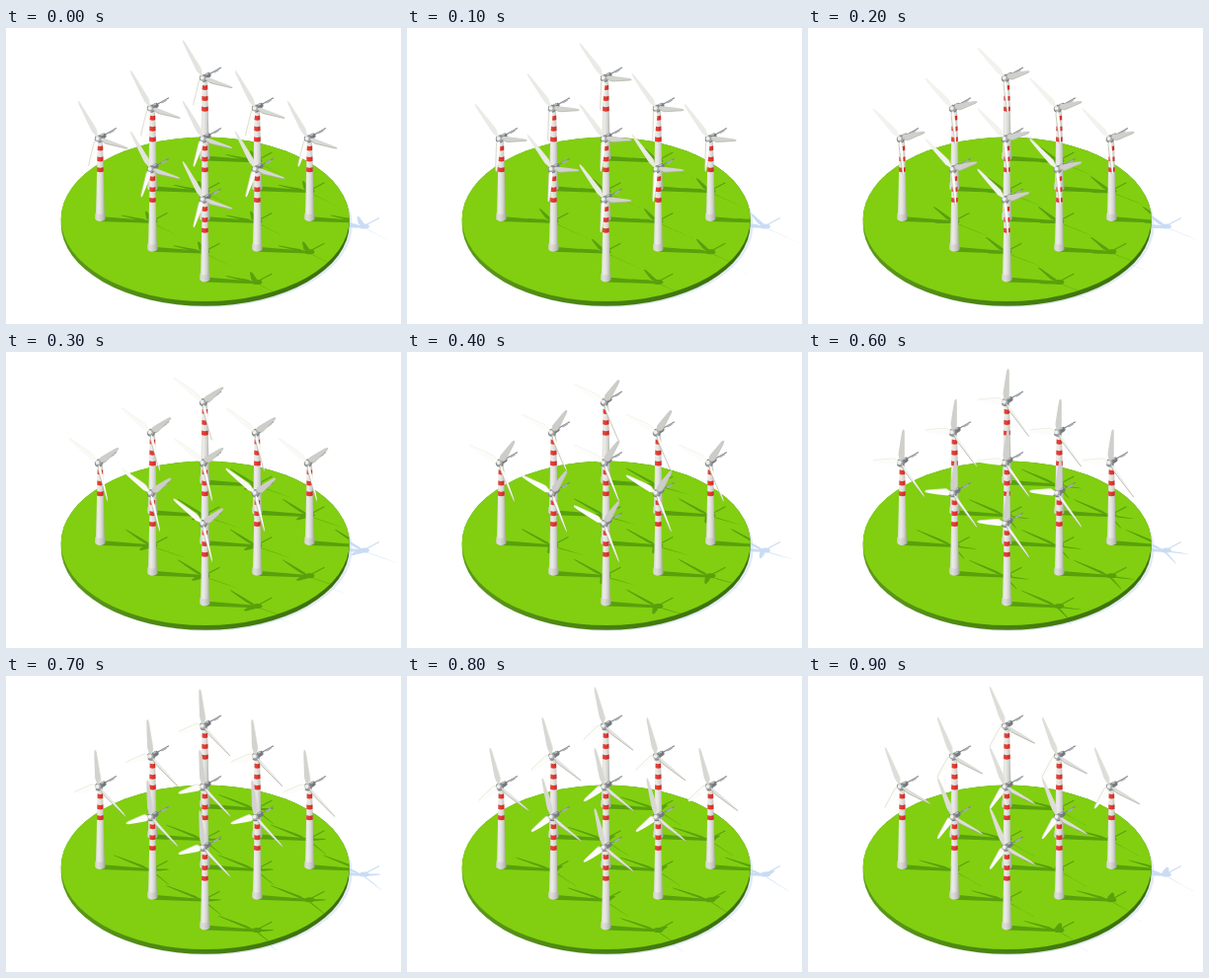
Recreate the animation shown at these times as an HTML page with a canvas. Size 400 px wide and 300 px high, loop 1 s.

```html
<!DOCTYPE html>
<html lang="en">
<head>
<meta charset="utf-8">
<title>Wind farm</title>
<style>
  html, body { margin: 0; width: 100%; height: 100%; overflow: hidden; background: #fff; }
  canvas { display: block; width: 400px; height: 300px; }
</style>
</head>
<body>
<canvas id="stage" width="400" height="300"></canvas>
<script>
const ctx = document.getElementById('stage').getContext('2d');

const LOOP = 1000, STEPS = 10;
const START = 42, SWEEP = 120;      // degrees, counterclockwise from upright
const RADIUS = 43;
const DISC = { x: 201.7, y: 193.8, rx: 146, ry: 83.2, depth: 4.8 };
const BASE = { x: 2, y: 82.5 };     // tower foot, from the hub
const CAST = { x: 51, y: 3 };       // shadow of the hub, from the foot
const PITCH = 12 * Math.PI / 180;

// Blade outline: distance along the blade, half chords on both sides
const OUTLINE = [
  [0.05, 1.4, -1.4], [0.12, 1.9, -2], [0.2, 3, -3.8], [0.28, 3, -3.8],
  [0.6, 2.3, -2.6], [0.92, 1.4, -1.4], [1, 0.6, -0.6]
];

const turbines = [];
for (let sum = 0; sum < 5; sum++)
  for (let i = 0; i < 3; i++) {
    const j = sum - i;
    if (j >= 0 && j < 3) turbines.push({ x: 199.4 + (i - j) * 53, y: 50.5 + sum * 30.75 });
  }

// h: across the rotor, v: up, a: along the axle
const view = (h, v, a) => [0.707 * (h + a), 0.403 * (h - a) - 0.823 * v];
const cast = (h, v, a) => [0.707 * (h + a) + 0.5 * v, 0.403 * (h - a) + 0.03 * v];

// Both long sides of a blade, each from root to tip
function bladeSides(x, y, angle, project) {
  const s = Math.sin(angle), c = Math.cos(angle);
  const point = (r, w) => {
    const t = w * Math.cos(PITCH), a = -w * Math.sin(PITCH);
    const [px, py] = project(-s * r * RADIUS - c * t, c * r * RADIUS - s * t, a);
    return [x + px, y + py];
  };
  return [OUTLINE.map(([r, w]) => point(r, w)), OUTLINE.map(([r, , w]) => point(r, w))];
}

function trace(pts) {
  pts.forEach(([x, y], n) => n ? ctx.lineTo(x, y) : ctx.moveTo(x, y));
}

function fillPath(color, build) {
  ctx.beginPath();
  build();
  ctx.closePath();
  ctx.fillStyle = color;
  ctx.fill();
}

const poly = (color, pts) => fillPath(color, () => trace(pts));

function ellipse(color, x, y, rx, ry) {
  fillPath(color, () => ctx.ellipse(x, y, rx, ry, 0, 0, Math.PI * 2));
}

function line(color, width, ...pts) {
  ctx.beginPath();
  trace(pts);
  ctx.strokeStyle = color;
  ctx.lineWidth = width;
  ctx.stroke();
}

const spokes = turn => [0, 1, 2].map(n => (turn + n * 120) * Math.PI / 180);

function shadow(t, turn, color, dx, dy) {
  const fx = t.x + BASE.x + dx, fy = t.y + BASE.y - 1 + dy;
  const cx = fx + CAST.x, cy = fy + CAST.y;
  poly(color, [[fx, fy - 2.6], [cx, cy - 1.2], [cx, cy + 1.2], [fx, fy + 2.4]]);
  ellipse(color, cx + 2, cy - 0.5, 5, 2.6);
  line(color, 1.2, [cx, cy], [cx + 17, cy - 9]);
  for (const angle of spokes(turn)) {
    const [a, b] = bladeSides(cx, cy, angle, cast);
    poly(color, a.concat(b.reverse()));
  }
}

function sideShade(x, half, stops) {
  const g = ctx.createLinearGradient(x - half, 0, x + half, 0);
  stops.forEach((color, n) => g.addColorStop(n / (stops.length - 1), color));
  return g;
}

function tower(x, top, foot) {
  const half = y => 2.6 + 1.9 * (y - top) / (foot - top);
  const band = (color, y1, y2) => {
    const a = half(y1), b = half(y2);
    fillPath(color, () => {
      ctx.moveTo(x - a, y1);
      ctx.quadraticCurveTo(x, y1 + 1.6, x + a, y1);
      ctx.lineTo(x + b, y2);
      ctx.quadraticCurveTo(x, y2 + 1.6, x - b, y2);
    });
  };
  const white = sideShade(x, 4.5, ['#dcdcd8', '#ecece8', '#d6d6d2', '#a8aaa3']);
  const red = sideShade(x, 3.5, ['#dc4a42', '#e3382f', '#c02a24']);
  band(white, top, foot);
  for (const y of [5.2, 16.2, 27]) band(red, top + y, top + y + 4.5);
  const ring = sideShade(x, 5.3, ['#d4d4cf', '#deded9', '#c8c8c3', '#9fa19a']);
  fillPath(ring, () => {
    ctx.moveTo(x - 5, foot - 7);
    ctx.quadraticCurveTo(x, foot - 4.5, x + 5, foot - 7);
    ctx.lineTo(x + 5.2, foot - 1);
    ctx.quadraticCurveTo(x, foot + 4, x - 5.2, foot - 1);
  });
}

// Light that is strongest on blades pointing towards `peak` degrees
function shade(angle, base, swing, peak, tint) {
  const k = Math.min(252, Math.round(base + swing * Math.cos(angle - peak * Math.PI / 180)));
  return `rgb(${k},${k},${k - tint})`;
}

function blade(x, y, angle) {
  const [a, b] = bladeSides(x, y, angle, view);
  poly(shade(angle, 238, 34, 150, 3), a.concat(b.slice().reverse()));
  line(shade(angle, 204, 38, 75, 12), 0.7, ...b);
}

function turbine({ x, y }, turn) {
  tower(x + BASE.x, y + 2, y + BASE.y);
  line('#85898c', 1.2, [x + 6, y - 3.5], [x + 18.5, y - 10.5]);
  line('#a6adb2', 1.8, [x + 11, y - 5.5], [x + 16, y - 8.4]);
  ctx.lineCap = 'round';
  line('#74797d', 5.2, [x + 1, y], [x + 5.5, y - 2.7]);
  line('#b9bec1', 1.8, [x + 1, y - 2], [x + 5, y - 4.2]);
  ctx.lineCap = 'butt';
  ellipse('#7d8285', x + 0.4, y + 0.4, 4, 4);
  for (const angle of spokes(turn)) blade(x, y, angle);
  ellipse('#a3a7a8', x, y + 0.4, 2.9, 2.9);
  ellipse('#eeeeeb', x - 0.8, y, 2, 2);
}

function disc(turn) {
  const { x, y, rx, ry, depth } = DISC;
  ellipse('#e3ebf9', x + 3, y + depth + 1, rx, ry);
  turbines.forEach(t => shadow(t, turn, '#c9dcf5', 2.5, 5));
  const side = sideShade(x, rx, ['#5d9a1c', '#47800f', '#3b6d0c']);
  fillPath(side, () => {
    ctx.ellipse(x, y + depth, rx, ry, 0, 0, Math.PI);
    ctx.ellipse(x, y, rx, ry, 0, Math.PI, Math.PI * 2);
  });
  ellipse('#81cf10', x, y, rx, ry);
  ctx.save();
  ctx.beginPath();
  ctx.ellipse(x, y, rx, ry, 0, 0, Math.PI * 2);
  ctx.clip();
  turbines.forEach(t => shadow(t, turn, '#58a00c', 0, 0));
  ctx.restore();
}

function draw(ms) {
  const step = Math.floor((ms % LOOP) / LOOP * STEPS);
  const turn = START + step * SWEEP / STEPS;
  ctx.fillStyle = '#fff';
  ctx.fillRect(0, 0, 400, 300);
  disc(turn);
  turbines.forEach(t => turbine(t, turn));
}

const begin = performance.now();
function tick() {
  draw(performance.now() - begin);
  requestAnimationFrame(tick);
}
tick();
</script>
</body>
</html>
```
